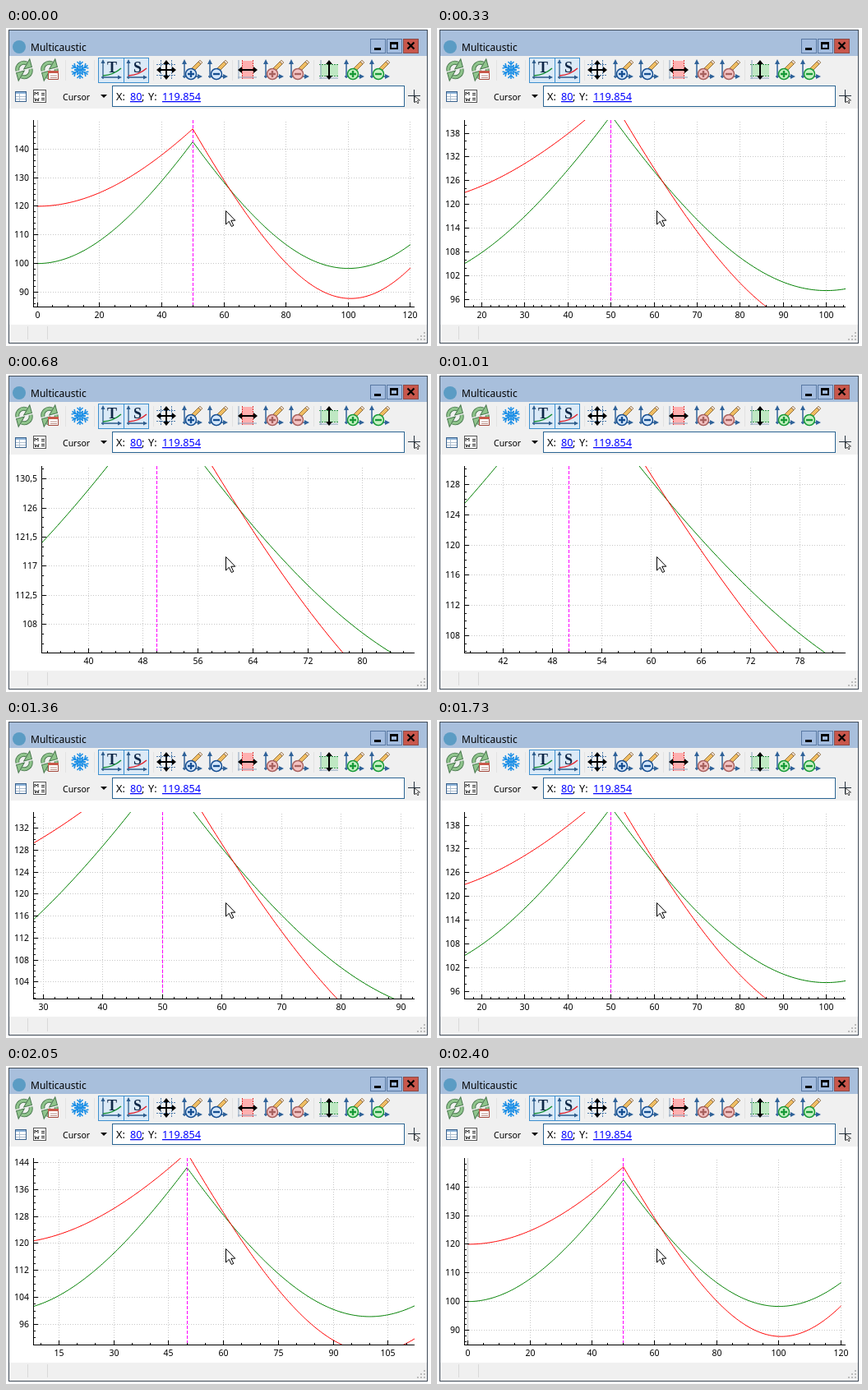
Animation of 517x387 px, one loop 3.9 s. Source, as an HTML page:

```html
<!DOCTYPE html>
<html lang="en">
<head>
<meta charset="utf-8">
<title>Multicaustic</title>
<style>
  html, body { margin: 0; width: 100%; height: 100%; overflow: hidden; background: #fff; }
  svg { display: block; }
  text { font: 10.5px "Noto Sans", sans-serif; fill: #000; }
  .title { font-size: 12px; }
  .value { font-size: 12.7px; }
  .link { fill: #00f; text-decoration: underline; }
  .letter { font: bold 18px "Liberation Serif", serif; fill: #102848; }
  .crisp { shape-rendering: crispEdges; }
  .line { fill: none; stroke-width: 1; }
  .grid { stroke: #c8c8c8; stroke-dasharray: 1 2; }
  .zero { stroke: #c8c8c8; }
  .marker { stroke: #f0f; stroke-dasharray: 4 2; }
  .axis { stroke: #000; }
  .ylab { text-anchor: end; }
  .xlab { text-anchor: middle; }
</style>
</head>
<body>
<svg width="517" height="387" viewBox="0 0 517 387">
  <defs>
    <clipPath id="clip"><rect id="clipBox" y="112" width="464" height="227"/></clipPath>
    <g id="refresh" transform="rotate(-15)">
      <g fill="none" stroke="#47764c" stroke-width="5">
        <path d="M-8 -1A8 8 0 0 1 5 -7M8 1A8 8 0 0 1-5 7"/>
        <path d="M-8 -1A8 8 0 0 1 5 -7M8 1A8 8 0 0 1-5 7" stroke="#8fc48c" stroke-width="3.2"/>
      </g>
      <path d="M10-11V-1H0ZM-10 11V1H0Z" fill="#8fc48c" stroke="#47764c"/>
    </g>
    <g id="flake" stroke="#1c8fe6" stroke-width="1.5" fill="none">
      <path id="arm" d="M0-11V11M-3.5-10 0-6.5 3.5-10M-3.5-6 0-2.5 3.5-6M-3.5 10 0 6.5 3.5 10M-3.5 6 0 2.5 3.5 6"/>
      <use href="#arm" transform="rotate(60)"/><use href="#arm" transform="rotate(120)"/>
    </g>
    <g id="axes">
      <path d="M-9 10V-9M-11 8H9" fill="none" stroke="#2f6299" stroke-width="1.5"/>
      <path d="M-12-7 -9-13 -6-7ZM7 5 13 8 7 11Z" fill="#2f6299"/>
    </g>
    <g id="pencil">
      <path d="M0-2 8-10 11-7 3 1-1 2Z" fill="#f0bd62" stroke="#7b5a2b" stroke-width=".8"/>
      <path d="M8-10 10-12 13-9 11-7Z" fill="#e7d2c1" stroke="#7b5a2b" stroke-width=".6"/>
    </g>
    <path id="arrows" d="M-12 0-7-4V-1H7V-4L12 0 7 4V1H-7V4Z"/>
    <g id="plot">
      <path d="M-10 11V-10M-12 9H10" stroke="#2d5c8d" stroke-width="1.3"/>
      <path d="M-12.5-8 -10-13 -7.5-8ZM8 6.5 13 9 8 11.5Z" fill="#2d5c8d"/>
    </g>
  </defs>

  <rect width="517" height="387" fill="#fff"/>
  <g class="crisp">
    <rect x="3.5" y="2.5" width="509" height="381" fill="#f0f0f0" stroke="#3f4a57"/>
    <rect x="4" y="3" width="508" height="31" fill="#a8bfdc"/>
    <rect x="4" y="98" width="508" height="263" fill="#fff"/>
    <path d="M26.5 363V379M50.5 363V379" stroke="#d9d9d9"/>
    <path d="M508 370h2v2h-2zM508 374h2v2h-2zM504 374h2v2h-2zM508 378h2v2h-2zM504 378h2v2h-2zM500 378h2v2h-2z" fill="#bcbcbc"/>
    <g fill="#a3bcdf" stroke="#5878a3">
      <rect x="443.5" y="13.5" width="18" height="17"/>
      <rect x="463.5" y="13.5" width="18" height="17"/>
      <rect x="483.5" y="13.5" width="18" height="17" fill="#c9574c" stroke="#8a4a48"/>
    </g>
    <path d="M448 24h8v3h-8z"/>
    <path d="M467 17h10v9h-10zM469 20v4h6v-4z" fill-rule="evenodd"/>
    <path d="M72.5 39V64M107.5 39V64M179.5 39V64M275.5 39V64M374.5 39V64" stroke="#e2e2e2"/>
  </g>
  <path d="M488.5 17.5 496.500 25.500M496.500 17.500 488.500 25.500" stroke="#000" stroke-width="2.2"/>
  <circle cx="16" cy="23" r="8" fill="#5b9cc4"/>
  <text class="title" x="30" y="27.500">Multicaustic</text>

  <g id="tools">
    <use href="#refresh" x="22" y="51"/>
    <use href="#refresh" x="53" y="51"/>
    <path d="M51.5 52.5h12v10h-12z" fill="#fff" stroke="#a34a3e"/>
    <path d="M51 52h13v3H51z" fill="#c8594a"/>
    <path d="M54 58h8M54 60.5h8" stroke="#b98c84"/>
    <use href="#flake" x="90" y="51"/>
    <g class="crisp" fill="#dbeaf7" stroke="#3d8fce">
      <rect x="112.5" y="36.5" width="31" height="30"/><rect x="143.5" y="36.5" width="30" height="30"/>
    </g>
    <use href="#plot" x="128" y="51"/><use href="#plot" x="159" y="51"/>
    <path d="M118 58Q131 57 140 49" fill="none" stroke="#169036" stroke-width="1.6"/>
    <path d="M149 58Q162 57 171 49" fill="none" stroke="#e02430" stroke-width="1.6"/>
    <text class="letter" x="123" y="54">T</text><text class="letter" x="155" y="54">S</text>
    <path d="M188.5 39V63M201.5 39V63M183 44.5H207M183 57.5H207" stroke="#4f7cac" stroke-dasharray="2 1"/>
    <use href="#arrows" x="195" y="51"/><use href="#arrows" transform="translate(195 51) rotate(90)"/>
    <path d="M287 40h13v22h-13z" fill="#ffb0b0"/>
    <path d="M287.5 39V63M300.5 39V63" stroke="#d33" stroke-dasharray="2 1"/>
    <path d="M283 39V62M282 60H305" stroke="#8aa2bd"/>
    <use href="#arrows" x="294" y="51"/>
    <path d="M382 45h22v13h-22z" fill="#bfe8c3"/>
    <path d="M381 44.5H405M381 58.5H405" stroke="#2a9545" stroke-dasharray="2 1"/>
    <path d="M383 39V62M381 61H404" stroke="#8aa2bd"/>
    <use href="#arrows" transform="translate(393 51) rotate(90)"/>
  </g>

  <g class="crisp">
    <rect x="11.5" y="77.5" width="13" height="12" fill="#fff" stroke="#3a628d"/>
    <path d="M12 78h12v2H12z" fill="#8db3d8"/>
    <path d="M12 83.5H24M12 86.5H24M16.5 80V89" stroke="#aebfd0"/>
    <rect x="33.5" y="75.5" width="15" height="15" fill="#fff" stroke="#555"/>
    <path d="M43 79.5h4M43 81.5h4M43 85.5h4M43 87.5h4" stroke="#222"/>
    <rect x="129.5" y="70.5" width="355" height="25" fill="#fff" stroke="#2c6593"/>
    <path d="M489 82.5H504M496.5 75V90" stroke="#24303c"/>
  </g>
  <path d="M35 82v-4l2 2 2-2v4M35 85l1 4 1.5-3 1.5 3 1-4" fill="none" stroke="#222"/>
  <path d="M497 83v8l2-2 2 3 1-1-1.5-3h3z" fill="#fff" stroke="#222" stroke-width=".8"/>
  <text x="69" y="88">Cursor</text>
  <path d="M115 81h8l-4 4z"/>
  <text class="value" y="88"><tspan x="134">X:</tspan><tspan class="link" x="151">80</tspan><tspan x="165">;</tspan><tspan x="173">Y:</tspan><tspan class="link" x="190">119.854</tspan></text>

  <g id="chart"></g>
  <path d="M267.5 222.5v16.5l3.800-3.700 3 6.200 2.500-1.100-3-6.200h5z" fill="#fff" stroke="#000"/>
</svg>

<script>
const LOOP = 3900, TOP = 112, BOTTOM = 339, RIGHT = 497;
const FACTOR = 0.85, ANCHOR = { x: 60.65, y: 118.45 };
const FULL = { x: [-1.2, 121.2], y: [84.84, 149.96] };

// Wheel steps: start time, zoom level, leftover x offset
const STEPS = [
  [0, 0, 0], [330, 2, 0], [680, 5, 0], [1010, 6, 0],
  [1360, 4, 0], [1730, 2, 0], [2050, 1, 0], [2400, 0, 0.12]
];

// Beam size on either side of the lens at x = 50
const beam = (waist, at, slope) => x => Math.sqrt(waist * waist + slope * (x - at) ** 2);
const CURVES = [
  ['#008000', beam(100, 0, 4.12), beam(98.3, 100, 4.263)],
  ['#f00', beam(120, 0, 2.884), beam(87.8, 100.8, 5.386)]
];

const chart = document.getElementById('chart');
const clipBox = document.getElementById('clipBox');

const zoomed = (axis, zoom, shift) => FULL[axis].map(v =>
  ANCHOR[axis] + (v - ANCHOR[axis]) * FACTOR ** zoom + shift);

function tickStep([lo, hi]) {
  const raw = (hi - lo) / 6;
  const power = 10 ** Math.floor(Math.log10(raw));
  const m = raw / power;
  const clean = m <= 5 ? Math.floor(m * 2) / 2 : Math.floor(m / 2) * 2;
  const parts = { 1: 5, 1.5: 3, 2: 4, 2.5: 5, 3: 3, 4: 4, 4.5: 3, 5: 5, 6: 3, 8: 4 }[clean];
  return { step: clean * power, parts };
}

function ticks(range) {
  const { step, parts } = tickStep(range), sub = step / parts, list = [];
  for (let i = Math.ceil(range[0] / sub); i * sub <= range[1]; i++)
    list.push({ value: i * sub, major: i % parts === 0 });
  return list;
}

const path = (d, cls, attrs = '') => `<path class="line ${cls}" d="${d}" ${attrs}/>`;
const label = (x, y, cls, v) =>
  `<text class="${cls}" x="${x}" y="${y}">${String(+v.toFixed(2)).replace('.', ',')}</text>`;

function draw([, zoom, shift]) {
  const xr = zoomed('x', zoom, shift), yr = zoomed('y', zoom, 0);
  const xt = ticks(xr), yt = ticks(yr);
  const left = yt.some(t => t.major && t.value % 1) ? 43 : 33;
  const px = x => left + 0.5 + (x - xr[0]) / (xr[1] - xr[0]) * (RIGHT - 1 - left);
  const py = y => BOTTOM + 0.5 - (y - yr[0]) / (yr[1] - yr[0]) * (BOTTOM - TOP);
  const snap = v => Math.floor(v) + 0.5;
  let grid = '', zero = '', marks = `M${left + 0.5} ${TOP}V${BOTTOM + 0.5}H${RIGHT}`, labels = '';

  for (const { value, major } of xt) {
    const x = snap(px(value));
    marks += `M${x} ${BOTTOM}v${major ? -5 : -2}`;
    if (!major) continue;
    const rule = `M${x} ${BOTTOM + 1}V${TOP}`;
    if (value) grid += rule; else zero = rule;
    labels += label(x, 353, 'xlab', value);
  }
  for (const { value, major } of yt) {
    const y = snap(py(value));
    marks += `M${left} ${y}h${major ? 6 : 3}`;
    if (!major) continue;
    grid += `M${left} ${y}H${RIGHT}`;
    labels += label(left - 5, y + 3.5, 'ylab', value);
  }

  const curves = CURVES.map(([color, before, after]) => {
    const pts = [];
    for (let x = 0; x <= 120; x += 0.5)
      pts.push(px(x).toFixed(2) + ' ' + py((x <= 50 ? before : after)(x)).toFixed(2));
    return path('M' + pts.join('L'), '', `stroke="${color}"`);
  }).join('');
  const marker = path(`M${snap(px(50))} ${TOP}V${BOTTOM}`, 'marker crisp');

  clipBox.setAttribute('x', left);
  chart.innerHTML = path(grid, 'grid crisp') + path(zero, 'zero crisp') +
    `<g clip-path="url(#clip)">${curves}${marker}</g>` +
    path(marks, 'axis crisp') + labels;
}

// Zoom buttons: axes, pencil and a signed disc
function zoomButton(x, color, edge, plus) {
  return `<g transform="translate(${x} 51)"><use href="#axes"/><use href="#pencil"/>
    <circle cx="-1" cy="5" r="6.5" fill="${color}" stroke="${edge}" stroke-width="1.5"/>
    <path d="M-5 5h8${plus ? 'M-1 1v8' : ''}" stroke="${edge}" stroke-width="2.4"/></g>`;
}
const SETS = [[226, '#d6e8fb', '#174f92'], [325, '#f4c4c4', '#a8625f'], [423, '#c9f2c5', '#189a38']];
document.getElementById('tools').insertAdjacentHTML('beforeend', SETS.map(([x, color, edge]) =>
  zoomButton(x, color, edge, true) + zoomButton(x + 31, color, edge, false)).join(''));

let shown;
function tick(now) {
  const t = now % LOOP;
  const step = STEPS.findLast(s => s[0] <= t) || STEPS[0];
  if (step !== shown) draw(shown = step);
  requestAnimationFrame(tick);
}
tick(performance.now());
</script>
</body>
</html>
```
